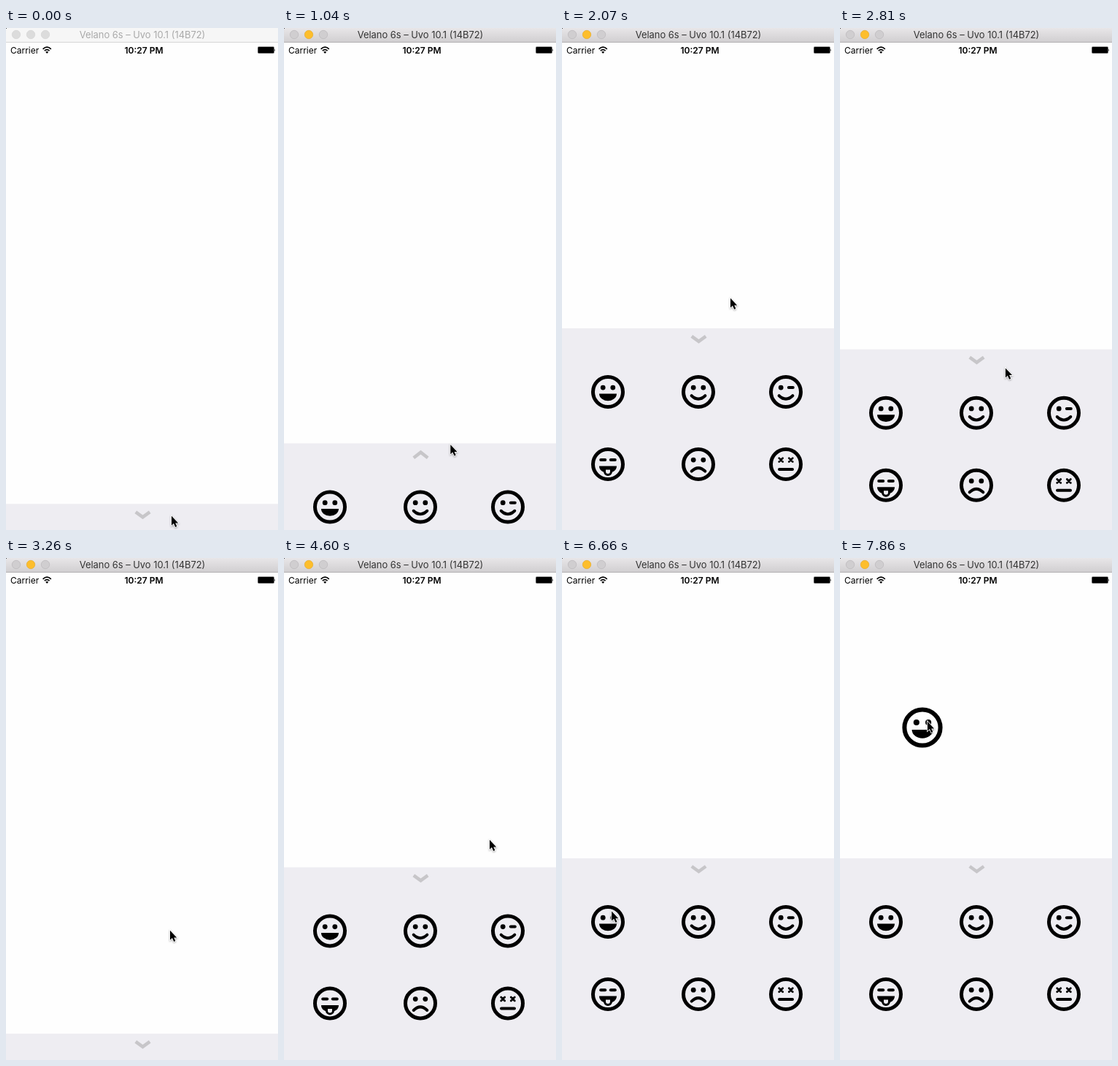
These frames come from a looping animation (373x687 px, 8000 ms). An HTML page:

```html
<!DOCTYPE html>
<html lang="en">
<head>
<meta charset="utf-8">
<title>Emoji tray</title>
<style>
  html, body { margin: 0; width: 100%; height: 100%; overflow: hidden; background: #fefefe; }
  svg { display: block; width: 373px; height: 687px; }
  text { font-family: Inter, "Open Sans", sans-serif; }
  .line { fill: none; stroke: #000; stroke-width: 4; stroke-linecap: round; }
  #cursor { filter: drop-shadow(0 1px 1px rgba(0, 0, 0, .35)); }

  #bar { fill: #f6f6f6; }
  #edge { fill: #d6d6d6; }
  #title { fill: #a9a9a9; }
  #buttons { fill: #dcdcdc; stroke: #d3d3d3; stroke-width: .7; }
  .active #bar { fill: url(#chrome); }
  .active #edge { fill: #b3b1b3; }
  .active #title { fill: #333; }
  .active #buttons { fill: #d0ced0; stroke: #bab8ba; }
  .active #minimize { fill: #fdbe2c; stroke: #e6ab2a; }
</style>
</head>
<body>
<svg viewBox="0 0 373 687">
  <defs>
    <linearGradient id="chrome" x2="0" y2="1">
      <stop stop-color="#e8e6e8"/><stop offset="1" stop-color="#d1cfd1"/>
    </linearGradient>
    <circle id="ring" r="20.5" fill="none" stroke="#000" stroke-width="5"/>
    <circle id="eye" r="3.4"/>
    <path id="dash" class="line" d="M-3 0H3"/>
    <path id="cross" class="line" style="stroke-width:2.8" d="M-2.5-2.5L2.5 2.5M2.5-2.5L-2.5 2.5"/>
    <path id="grin" d="M-12 2.5H12A12 9.8 0 0 1-12 2.5Z"/>
    <path id="smile" class="line" d="M-9.3 5.3Q0 14.3 9.3 5.3"/>
    <path id="frown" class="line" d="M-9.3 9.6Q0 .6 9.3 9.6"/>
    <path id="flat" class="line" d="M-9 7H9"/>
    <g id="tongue">
      <use href="#grin"/>
      <path d="M-4.5 6H4.5V10A4.5 4.5 0 0 1-4.5 10Z" fill="#eeedf2" stroke="#000" stroke-width="3"/>
    </g>
  </defs>

  <rect width="373" height="687" fill="#fefefe"/>
  <g id="window">
    <rect id="bar" width="373" height="19"/>
    <rect id="edge" y="19" width="373" height="1"/>
    <rect width="1" height="1" fill="#444"/>
    <g id="buttons">
      <circle cx="14" cy="9" r="5.7"/><circle id="minimize" cx="34" cy="9" r="5.7"/><circle cx="54" cy="9" r="5.7"/>
    </g>
    <text id="title" x="187" y="14" font-size="12.9" text-anchor="middle">Velano 6s – Uvo 10.1 (14B72)</text>
  </g>

  <text x="6" y="35" font-size="12">Carrier</text>
  <g fill="none" stroke="#000" stroke-width="1.7">
    <path d="M50.6 28.8Q56.2 23.6 61.8 28.8M52.8 31.1Q56.2 28 59.6 31.1"/>
    <path d="M56.2 35L54.2 32.8Q56.2 31 58.2 32.8Z" fill="#000" stroke="none"/>
  </g>
  <text x="189" y="35" font-size="12" font-weight="600" text-anchor="middle">10:27 PM</text>
  <rect x="345" y="25.3" width="23" height="9.6" rx="1.6" fill="#888"/>
  <rect x="345.7" y="26" width="21.6" height="8.2" rx="1"/>
  <path d="M368.4 28.5Q370 30.2 368.4 32Z"/>

  <g id="tray">
    <rect width="373" height="687" fill="#eeedf2"/>
    <path id="arrow" fill="none" stroke="#c7c6c9" stroke-width="4.6"/>
  </g>
  <g id="dragged"></g>
  <path id="cursor" d="M0 0V14.5L3.3 11.5L5.8 17L8.2 16L5.8 10.8H10.2Z"
        stroke="#fff" stroke-width="1.8" paint-order="stroke"/>
</svg>
<script>
const LOOP = 8000, STEPS = 54;
const OPEN = 411, CLOSED = 651.3;
const $ = id => document.getElementById(id);
const clamp = (v, low, high) => Math.max(low, Math.min(high, v));

// Faces: left eye, right eye, mouth
const faces = [
  ['eye', 'eye', 'grin'], ['eye', 'eye', 'smile'], ['eye', 'dash', 'smile'],
  ['dash', 'dash', 'tongue'], ['eye', 'eye', 'frown'], ['cross', 'cross', 'flat']
];
const columns = [63, 187, 307];
const use = (id, x = 0, y = 0) => `<use href="#${id}" x="${x}" y="${y}"/>`;
const face = ([left, right, mouth]) =>
  use('ring') + use(left, -6.8, -5.8) + use(right, 6.8, -5.8) + use(mouth);

$('tray').insertAdjacentHTML('beforeend', faces.map((parts, i) =>
  `<g transform="translate(${columns[i % 3]} ${87 + 99 * Math.floor(i / 3)})">${face(parts)}</g>`
).join(''));
$('dragged').innerHTML = face(faces[0]);

// Cursor moves, timed in steps; it rests between them
const moves = [
  { start: 3.9, end: 12, x: 231, y: 370 },   // pull the tray up
  { start: 14, end: 22, x: 225, y: 510 },    // push it down
  { start: 22, end: 26, x: 256, y: 668 },
  { start: 26, end: 30, x: 282, y: 386 },    // pull it up again
  { start: 34, end: 42, x: 67, y: 490 },
  { start: 44.4, end: 51, x: 117, y: 223 },  // drag a face out
  { start: 52, end: 53, x: 120, y: 224 }
];

function cursorAt(step) {
  let x = 227, y = 668;
  for (const move of moves) {
    const u = clamp((step - move.start) / (move.end - move.start), 0, 1);
    const k = u * u * (3 - 2 * u);
    x += (move.x - x) * k;
    y += (move.y - y) * k;
  }
  return { x, y };
}

const pullUp = step => Math.min(CLOSED, cursorAt(step).y - 2);
const pushDown = step => clamp(cursorAt(step).y - 26, OPEN, CLOSED);
const spring = (from, to, t) =>
  Math.min(CLOSED, to + (from - to) * Math.exp(-.78 * t ** 3) * Math.cos(Math.PI * t));

const isPullingUp = step => step <= 12 || (step >= 26 && step <= 30);

function trayTop(step) {
  if (isPullingUp(step)) return pullUp(step);
  if (step < 16) return spring(pullUp(12), OPEN, step - 12);
  if (step <= 20) return pushDown(step);
  if (step < 26) return spring(pushDown(20), CLOSED, step - 20);
  return spring(pullUp(30), OPEN, step - 30);
}

function place(id, x, y, scale) {
  $(id).setAttribute('transform', `translate(${x} ${y}) scale(${scale})`);
}

function draw() {
  const time = performance.now() % LOOP;
  const step = Math.min(STEPS - 1, Math.floor((time + 10) * STEPS / LOOP));
  const cursor = cursorAt(step);
  const grip = cursorAt(Math.min(step, 51));
  const top = trayTop(step);
  const arrowUp = isPullingUp(step) && top < CLOSED;

  $('window').classList.toggle('active', step >= 2);
  $('arrow').setAttribute('d', arrowUp ? 'M177.8 19.8L187.5 12.3L197.2 19.8' : 'M177.8 11L187.5 18L197.2 11');
  $('dragged').style.display = step >= 46 ? '' : 'none';
  place('tray', 0, top, 1);
  place('dragged', grip.x - 4, grip.y + 9, 1.2);
  place('cursor', cursor.x, cursor.y - .3, .9);
  requestAnimationFrame(draw);
}
draw();
</script>
</body>
</html>
```
